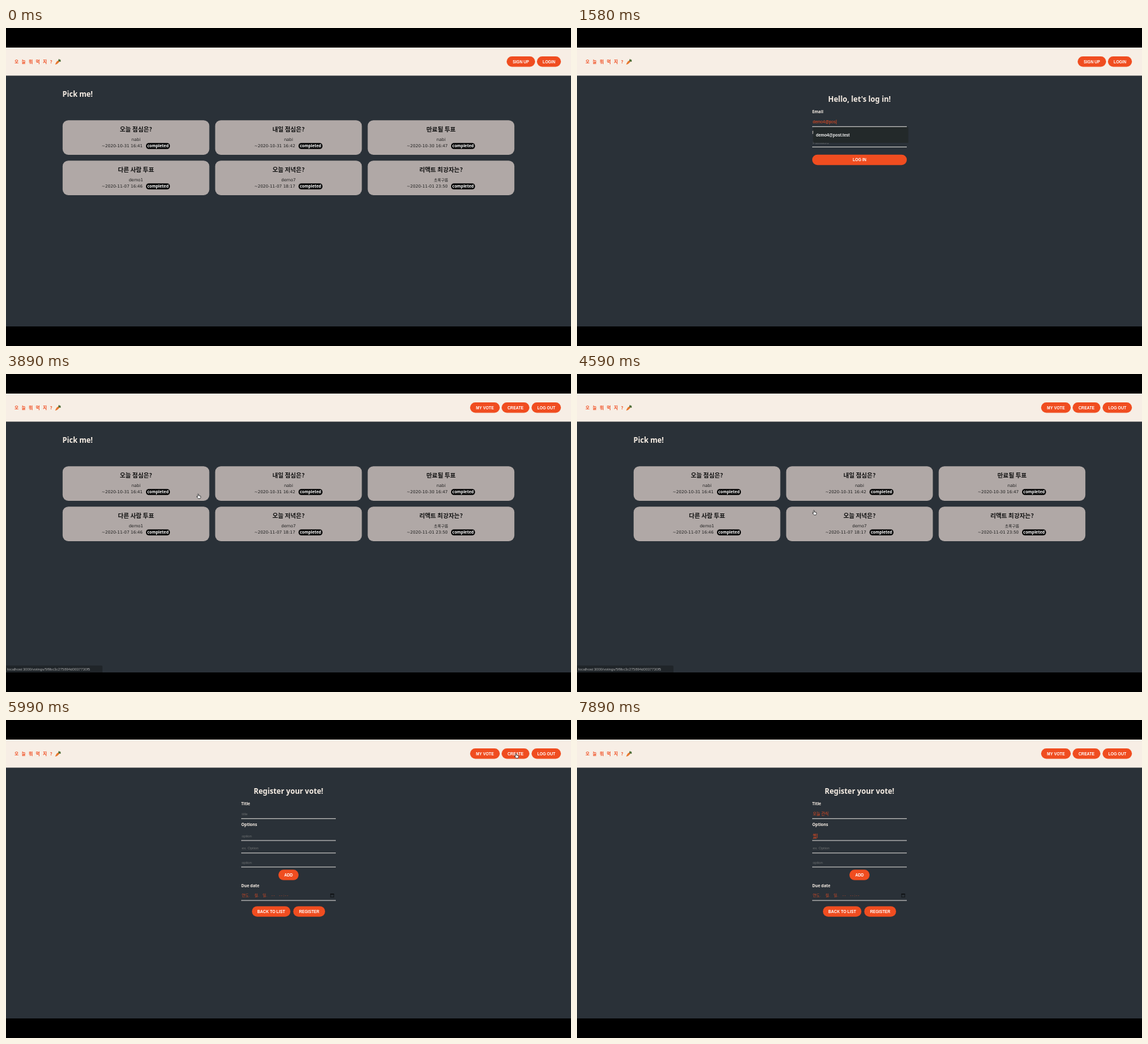
Animation of 896 by 504 pixels, one loop 7990 ms. Source, as an HTML page with a canvas:

```html
<!DOCTYPE html>
<html lang="ko">
<head>
<meta charset="utf-8">
<title>오늘 뭐 먹지?</title>
<style>
html, body { margin: 0; width: 100%; height: 100%; overflow: hidden; background: #000; }
canvas { display: block; width: 896px; height: 504px; }
</style>
</head>
<body>
<canvas id="stage" width="896" height="504"></canvas>
<script>
const ctx = document.getElementById('stage').getContext('2d');
const LOOP = 7990;
const ORANGE = '#f04d20', CREAM = '#f7eee5', NIGHT = '#2a3138', CARD = '#b0a8a6';
const SANS = '"Noto Sans", "Noto Sans CJK KR", sans-serif';
const WIDE = '"DejaVu Sans", "Noto Sans CJK KR", sans-serif';
const ARIAL = '"Liberation Sans", "Noto Sans CJK KR", sans-serif';
const KOREAN = '"Noto Sans CJK KR", sans-serif';

const EMAIL = 'demo4@post.test';
const LOGIN_AT = 480, HOME_AT = 3290, CREATE_AT = 5890;

const votes = [
  ['오늘 점심은?', 'nabi', '2020-10-31 16:41'],
  ['내일 점심은?', 'nabi', '2020-10-31 16:42'],
  ['만료될 투표', 'nabi', '2020-10-30 16:47'],
  ['다른 사람 투표', 'demo1', '2020-11-07 16:46'],
  ['오늘 저녁은?', 'demo7', '2020-11-07 18:17'],
  ['리액트 최강자는?', '초록구름', '2020-11-01 23:50']
];
const guestNav = [['SIGN UP', 794, 45], ['LOGIN', 842, 38]];
const userNav = [['MY VOTE', 736, 47], ['CREATE', 786, 44], ['LOG OUT', 833.5, 46.5]];

const titleKeys = ['ㅇ', '오', '오느', '오늘', '오늘 ㄱ', '오늘 가', '오늘 간', '오늘 간시', '오늘 간식'];
const optionKeys = ['ㅎ', '해', '햄'];

// Pointer stops: time, x, y
const trips = [
  [[80, 790, 130], [380, 861, 53], [580, 861, 53], [880, 430, 149]],
  [[3290, 440, 212], [3890, 304, 190], [4390, 310, 192], [4790, 440, 240],
   [5290, 603, 275], [5690, 808, 53], [5990, 808, 53], [6290, 430, 149], [6390, 430, 149]]
];

const clamp = (v, lo, hi) => Math.max(lo, Math.min(hi, v));
const ease = u => u * u * (3 - 2 * u);

function box(x, y, w, h, r, color) {
  ctx.fillStyle = color;
  ctx.beginPath();
  ctx.roundRect(x, y, w, h, r);
  ctx.fill();
}

// Text is placed by its vertical centre
function text(str, x, y, size, color, { font = SANS, weight = 400, align = 'left', gap = 0 } = {}) {
  ctx.font = `${weight} ${size}px ${font}`;
  ctx.letterSpacing = gap + 'px';
  ctx.textAlign = align;
  ctx.fillStyle = color;
  ctx.fillText(str, x, y + size * 0.36);
  const w = ctx.measureText(str).width;
  ctx.letterSpacing = '0px';
  return w;
}

function button(label, x, y, w) {
  box(x, y, w, 16.5, 8.2, ORANGE);
  text(label, x + w / 2, y + 8.3, 6.3, '#fff', { font: ARIAL, weight: 700, align: 'center' });
}

function carrot(x, y) {
  ctx.save();
  ctx.translate(x, y);
  ctx.fillStyle = '#e8762c';
  ctx.beginPath();
  ctx.moveTo(0, 9);
  ctx.quadraticCurveTo(1.5, 4, 4.5, 2.8);
  ctx.quadraticCurveTo(7, 3, 6.4, 5);
  ctx.quadraticCurveTo(4, 8, 0, 9);
  ctx.fill();
  ctx.strokeStyle = '#4b6b35';
  ctx.lineWidth = 1.5;
  ctx.beginPath();
  ctx.moveTo(5.5, 3.6); ctx.lineTo(6.2, 0.4);
  ctx.moveTo(5.8, 3.4); ctx.lineTo(8.4, 1.3);
  ctx.moveTo(6, 3.6); ctx.lineTo(9, 3.5);
  ctx.stroke();
  ctx.restore();
}

function frame(nav) {
  ctx.fillStyle = '#000';
  ctx.fillRect(0, 0, 896, 504);
  ctx.fillStyle = NIGHT;
  ctx.fillRect(0, 75, 896, 398);
  ctx.fillStyle = CREAM;
  ctx.fillRect(0, 31, 896, 44.5);
  text('오늘뭐먹지?', 13.5, 53.5, 7, ORANGE, { font: KOREAN, weight: 700, gap: 4.8 });
  carrot(78, 49);
  for (const [label, x, w] of nav) button(label, x, 45, w);
}

function list() {
  text('Pick me!', 89.5, 105.3, 11.5, CREAM, { weight: 700 });
  votes.forEach(([title, user, due], i) => {
    const x = 89.8 + (i % 3) * 241.9, y = 146.2 + Math.floor(i / 3) * 64;
    const mid = x + 116.3;
    box(x, y, 232.6, 54.8, 9, CARD);
    text(title, mid, y + 14.6, 9.6, '#111', { font: KOREAN, weight: 700, align: 'center' });
    text(user, mid, y + 30.2, i === 5 ? 6.2 : 6.6, '#222', { font: WIDE, align: 'center' });
    text('~' + due, x + 62, y + 40.8, 6.6, '#222', { font: WIDE });
    box(x + 132.2, y + 36, 38, 9.6, 4.5, '#050505');
    text('completed', x + 151.2, y + 40.8, 6.4, '#fff', { weight: 700, align: 'center' });
  });
}

function field(lineY, textY, value, hint, focus) {
  ctx.fillStyle = '#dedbd7';
  ctx.fillRect(373, lineY - 0.5, 150, 1);
  const w = value
    ? text(value, 374, textY, 6.35, ORANGE, { font: ARIAL })
    : text(hint, 374, textY, 5.8, '#6c6f70', { font: ARIAL }) * 0;
  if (focus) caret(374.7 + w, textY);
}

function caret(x, y) {
  ctx.fillStyle = ORANGE;
  ctx.fillRect(x, y - 3.5, 0.7, 7);
}

function label(str, y) {
  text(str, 373, y, 6.4, CREAM, { weight: 600 });
}

function heading(str) {
  text(str, 448, 113, 11.65, CREAM, { weight: 700, align: 'center' });
}

function suggest(items, h) {
  box(374.5, 157, 151, h, 1, '#23292a');
  items.forEach((s, i) =>
    text(s, 379, 169.5 + i * 16.8, /[가-힣]/.test(s) ? 5.9 : 6.4, '#f2f2f2', { font: ARIAL, weight: 700 }));
}

function login(t) {
  const typed = t < 980 ? 0 : t >= 1890 ? EMAIL.length
    : clamp(Math.floor((t - 980) / 75) + 1, 0, EMAIL.length);
  const dots = clamp(Math.floor((t - 2190) / 60), 0, 10);
  heading("Hello, let's log in!");
  label('Email', 133);
  field(156.3, 149, EMAIL.slice(0, typed), 'Email', t >= 880 && t < 2090);
  label('Password', 165.5);
  field(188.6, 181.5, '', dots ? '' : 'Password', false);
  ctx.fillStyle = ORANGE;
  for (let i = 0; i < dots; i++) {
    ctx.beginPath();
    ctx.arc(375.4 + i * 2.4, 181.5, 0.85, 0, 7);
    ctx.fill();
  }
  if (t >= 2090) caret(374.5 + dots * 2.4, 181.5);
  if (typed && t < 1890) suggest([EMAIL], 25);
  button('LOG IN', 373, 200.7, 150);
}

function stroke(keys, start, t) {
  const i = Math.floor((t - start) / 100);
  return i < 0 ? '' : keys[Math.min(i, keys.length - 1)];
}

function register(t) {
  const title = stroke(titleKeys, 6490, t), option = stroke(optionKeys, 7690, t);
  heading('Register your vote!');
  label('Title', 133);
  field(156.3, 148.5, title, 'title', t >= 6390 && t < 7490);
  label('Options', 165.5);
  field(191, 183.5, option, 'option', t >= 7490);
  if (option) {
    ctx.fillStyle = ORANGE;
    ctx.fillRect(374, 187, 6, 0.6);
  }
  field(210.8, 202.8, '', 'ex. Option');
  field(233, 225.5, '', 'option');
  button('ADD', 432, 237.3, 32);
  label('Due date', 262.5);
  field(286, 278, '', '');
  const parts = [['연도.', 374], ['월.', 394], ['일.', 407], ['--', 421], ['--:--', 433]];
  for (const [s, x] of parts) text(s, x, 277.8, 6, '#d24a25', { font: ARIAL, gap: s[0] === '-' ? 1.2 : 0 });
  ctx.strokeStyle = '#111417';
  ctx.lineWidth = 0.9;
  ctx.strokeRect(514.8, 276, 5, 4.8);
  ctx.fillStyle = '#111417';
  ctx.fillRect(514.4, 275, 5.8, 2);
  button('BACK TO LIST', 390, 295.2, 61);
  button('REGISTER', 455.5, 295.2, 50.5);
  if (t >= 6490 && t < 6890) suggest(['오늘 점심은?', '오늘 저녁은?'], 42);
}

function status(str, w, fill, color) {
  box(0, 462, w, 11, [0, 2, 0, 0], fill);
  text(str, 2, 467.7, 5.9, color, { font: ARIAL });
}

function pointer(t) {
  for (const path of trips) {
    for (let i = 1; i < path.length; i++) {
      const [t0, x0, y0] = path[i - 1], [t1, x1, y1] = path[i];
      if (t < t0 || t > t1) continue;
      const u = ease((t - t0) / (t1 - t0));
      return [x0 + (x1 - x0) * u, y0 + (y1 - y0) * u];
    }
  }
  return null;
}

function drawPointer([x, y], hand) {
  ctx.save();
  ctx.translate(x, y);
  ctx.lineWidth = 0.8;
  ctx.lineJoin = 'round';
  ctx.beginPath();
  if (hand) {
    ctx.moveTo(0, 4.6);
    ctx.lineTo(0, 0.6);
    ctx.quadraticCurveTo(0.8, -0.6, 1.5, 0.6);
    ctx.lineTo(1.5, 2.8);
    ctx.lineTo(4.6, 3.4);
    ctx.quadraticCurveTo(5.4, 5.4, 4, 7.4);
    ctx.lineTo(0.8, 7.4);
    ctx.lineTo(-1.7, 4.2);
    ctx.quadraticCurveTo(-1, 3.3, 0, 4.6);
  } else {
    [[0, 0], [0, 6.6], [1.5, 5.3], [2.5, 7.7], [3.6, 7.2], [2.6, 4.9], [4.6, 4.8]]
      .forEach(p => ctx.lineTo(...p));
  }
  ctx.closePath();
  ctx.fillStyle = hand ? '#fff' : '#111';
  ctx.strokeStyle = hand ? '#222' : '#eee';
  ctx.fill();
  ctx.stroke();
  ctx.restore();
}

function overCard(x, y) {
  const dx = (x - 89.8) % 241.9, dy = (y - 146.2) % 64;
  return x > 89.8 && x < 806 && y > 146.2 && y < 265 && dx < 232.6 && dy < 54.8;
}

function step(t) {
  if (t < 80) return 0;
  if (t < 1690) return Math.min(1580, 80 + Math.floor((t - 80) / 100) * 100);
  return 1690 + Math.floor((t - 1690) / 100) * 100;
}

function draw(t) {
  const home = t < LOGIN_AT || (t >= HOME_AT && t < CREATE_AT);
  const at = pointer(t);
  frame(t < HOME_AT ? guestNav : userNav);
  if (home) list();
  else if (t < HOME_AT) login(t);
  else register(t);

  const onCard = home && at && overCard(...at);
  if (t >= 4890 && t < 5590) {
    status('localhost의 응답을 기다리는 중...', 301, '#252b30', '#777b7d');
  } else if (onCard && t >= 3590) {
    status('localhost:3000/votings/5f9bc3c275894d0037730f5', 153, '#202529', '#a9abac');
  }
  if (at) drawPointer(at, onCard || (at[1] < 62 && at[0] > 736));
}

const begin = performance.now();
function tick() {
  draw(step((performance.now() - begin) % LOOP));
  requestAnimationFrame(tick);
}
tick();
</script>
</body>
</html>
```
